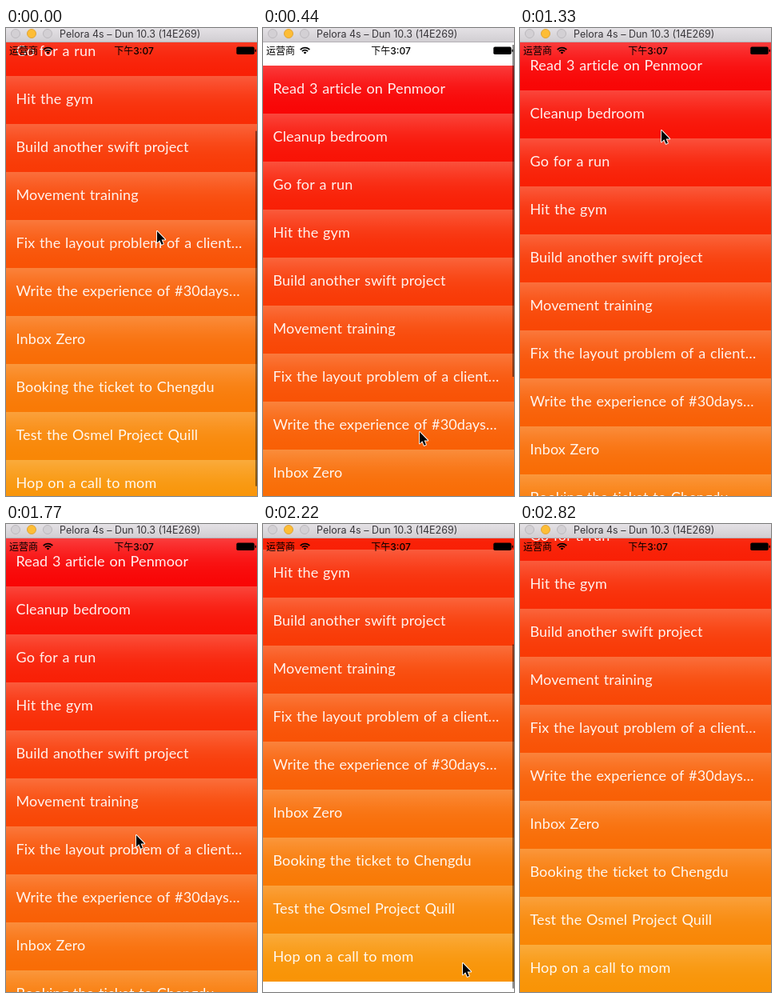
An HTML page with a canvas for the animation above (3720 ms loop, 314 by 585 pixels).

```html
<!DOCTYPE html>
<html lang="en">
<head>
<meta charset="utf-8">
<title>Gradient list</title>
<style>
  html, body { margin: 0; width: 100%; height: 100%; overflow: hidden; background: #fff; }
  canvas { display: block; width: 314px; height: 585px; }
</style>
</head>
<body>
<canvas id="stage" width="314" height="585"></canvas>
<script>
const ctx = document.getElementById('stage').getContext('2d');
const W = 314, H = 585, LOOP = 3720, LAST_STEP = 19;
const BAR_H = 18, ROW_H = 60, TOP_REST = 18, END_REST = -134;
const FLICK_TIME = 1920, POINTER_GONE = 2670;

const rows = [
  'Read 3 article on Penmoor',
  'Cleanup bedroom',
  'Go for a run',
  'Hit the gym',
  'Build another swift project',
  'Movement training',
  'Fix the layout problem of a client…',
  'Write the experience of #30days…',
  'Inbox Zero',
  'Booking the ticket to Chengdu',
  'Test the Osmel Project Quill',
  'Hop on a call to mom'
];

// Turning points of the pointer's path.
const pointerKeys = [
  { t: 0, x: 188, y: 253 },
  { t: 440, x: 195, y: 504 },
  { t: 740, x: 187, y: 205 },
  { t: 1040, x: 176, y: 84 },
  { t: 1330, x: 176, y: 126.5 },
  { t: 1700, x: 157, y: 420 },
  { t: 1920, x: 179, y: 285 },
  { t: 2220, x: 249, y: 548 }
];
const arrow = new Path2D('M1 1V15.4L4.3 12.3 6.6 17.8 8.9 16.9 6.6 11.5H11.2Z');

// The picture holds for about 150 ms per step, with three steps 10 ms shorter.
const stepStart = n => 150 * n - 10 * Math.min(3, Math.floor((n + 1.5) / 4.5));

function heldTime(elapsed) {
  let n = LAST_STEP;
  while (stepStart(n) > elapsed) n--;
  return stepStart(n);
}

// Critically damped bounce, s in seconds.
const spring = (pos, slope, s) => (pos + slope * s) * Math.exp(-10.9 * s);

function listTop(t) {
  if (t === 0) return -120;
  if (t < FLICK_TIME) return Math.round(TOP_REST + spring(85, 346, (t - 300) / 1000));
  return Math.round(END_REST - spring(14, 43.5, (t - 2220) / 1000));
}

function pointerAt(t) {
  const next = pointerKeys.findIndex(key => key.t > t);
  if (next < 0) return pointerKeys.at(-1);
  const a = pointerKeys[next - 1], b = pointerKeys[next];
  const p = (t - a.t) / (b.t - a.t);
  const eased = p * p * (3 - 2 * p);
  return { x: a.x + (b.x - a.x) * eased, y: a.y + (b.y - a.y) * eased };
}

function scrollbarAlpha(t) {
  const fadeStart = t < FLICK_TIME ? 1040 : 2670;
  if (t < fadeStart) return t > 1180 && t < FLICK_TIME ? 0 : 0.45;
  return t - fadeStart < 140 ? 0.22 : 0;
}

function label(text, x, y, font, color, letter = 0, word = 0) {
  ctx.font = font;
  ctx.fillStyle = color;
  ctx.letterSpacing = letter + 'px';
  ctx.wordSpacing = word + 'px';
  ctx.fillText(text, x, y);
}

function drawRow(text, i, y) {
  const green = Math.round(6 + 142 * i / (rows.length - 1));
  ctx.fillStyle = `rgb(249,${green},6)`;
  ctx.fillRect(0, y, W, ROW_H);

  const gloss = ctx.createLinearGradient(0, y, 0, y + ROW_H);
  for (let k = 0; k <= 1; k += 0.125) {
    gloss.addColorStop(k, `rgba(255,255,255,${0.22 * (1 - k) ** 2})`);
  }
  ctx.fillStyle = gloss;
  ctx.fillRect(0, y, W, ROW_H);

  label(text, 12.5, y + 35, '18px Lato, sans-serif', 'rgba(255,255,255,0.93)', 0.12, 1);
}

function drawScrollbar(top, alpha) {
  const over = Math.max(0, top - TOP_REST, END_REST - top);
  const length = 444 - over;
  const offset = Math.max(0, TOP_REST - top) * 562 / (rows.length * ROW_H);
  ctx.fillStyle = `rgba(0,0,0,${alpha})`;
  ctx.fillRect(312, Math.min(21 + offset, 583 - length), 2, length);
}

function drawWifi(x, y) {
  const fan = (r, close) => {
    ctx.beginPath();
    if (close) ctx.moveTo(x, y);
    ctx.arc(x, y, r, -Math.PI * 0.76, -Math.PI * 0.24);
  };
  ctx.strokeStyle = ctx.fillStyle = '#000';
  ctx.lineWidth = 1.7;
  fan(7.9);
  ctx.stroke();
  fan(4.9);
  ctx.stroke();
  fan(2.6, true);
  ctx.fill();
}

function drawStatus() {
  const font = '500 12px Inter, "Noto Sans CJK SC", "Noto Sans CJK", sans-serif';
  label('运营商', 4, 32.5, font, '#000');
  ctx.textAlign = 'center';
  label('下午3:07', 160, 32.5, font, '#000');
  ctx.textAlign = 'left';
  drawWifi(52.5, 32.5);

  ctx.beginPath();
  ctx.roundRect(288.3, 23.6, 22.4, 9.4, 1.8);
  ctx.fill();
  ctx.fillRect(311.5, 26.8, 1.4, 3);
}

function drawTitleBar() {
  const grey = ctx.createLinearGradient(0, 0, 0, BAR_H);
  grey.addColorStop(0, '#e4e1e5');
  grey.addColorStop(1, '#d0cdd1');
  ctx.fillStyle = grey;
  ctx.fillRect(0, 0, W, BAR_H);
  ctx.fillStyle = '#b5b1b6';
  ctx.fillRect(0, BAR_H - 1, W, 1);

  ctx.lineWidth = 0.9;
  for (let i = 0; i < 3; i++) {
    const lit = i === 1;
    ctx.beginPath();
    ctx.arc(12 + 20 * i, 7, 5.5, 0, Math.PI * 2);
    ctx.fillStyle = lit ? '#fdbd36' : '#d3d0d4';
    ctx.fill();
    ctx.strokeStyle = lit ? '#dfa02f' : '#b9b6ba';
    ctx.stroke();
  }
  label('Pelora 4s – Dun 10.3 (14E269)', 67, 11.8, '12.5px Inter, sans-serif', '#38363a');
}

function drawPointer({ x, y }) {
  ctx.save();
  ctx.translate(Math.round(x), Math.round(y));
  ctx.lineJoin = 'round';
  ctx.strokeStyle = '#fff';
  ctx.lineWidth = 1.8;
  ctx.stroke(arrow);
  ctx.fillStyle = '#000';
  ctx.fill(arrow);
  ctx.restore();
}

function draw(now) {
  const t = heldTime(now % LOOP);
  const top = listTop(t);

  ctx.fillStyle = '#fff';
  ctx.fillRect(0, 0, W, H);
  rows.forEach((text, i) => drawRow(text, i, top + i * ROW_H));
  drawScrollbar(top, scrollbarAlpha(t));
  drawStatus();
  drawTitleBar();
  if (t < POINTER_GONE) drawPointer(pointerAt(t));
}

function tick() {
  draw(performance.now());
  requestAnimationFrame(tick);
}
tick();
</script>
</body>
</html>
```
